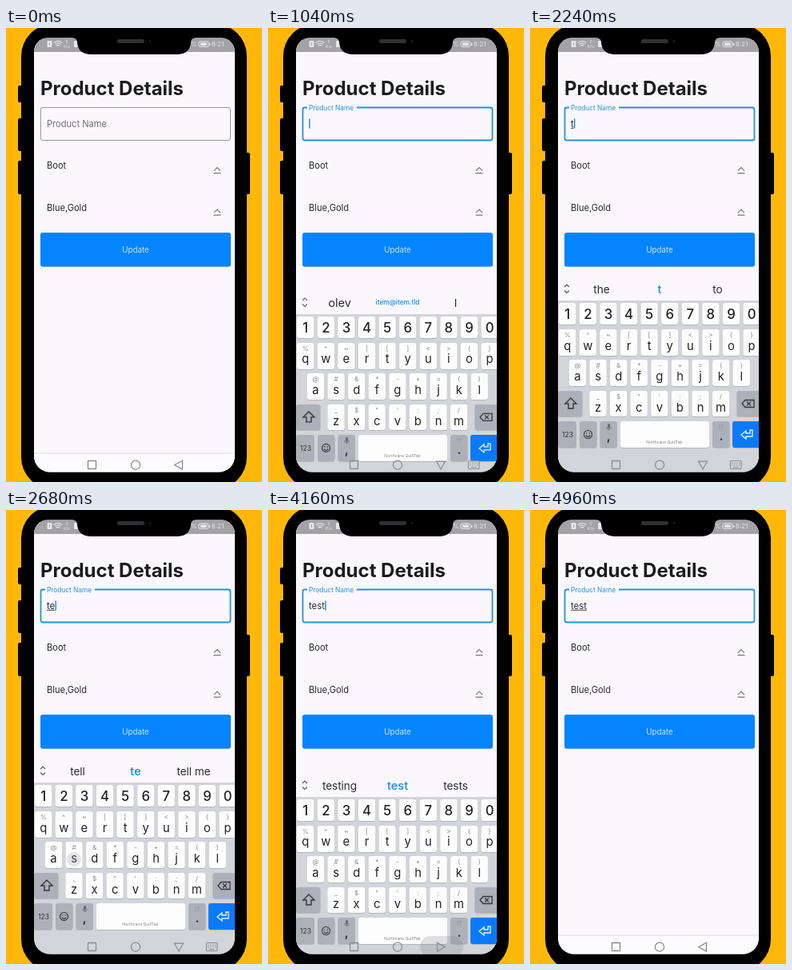
Animation of 320 by 568 pixels, one loop 5 s. Source, as an HTML page with a canvas:

```html
<!DOCTYPE html>
<html lang="en">
<head>
<meta charset="utf-8">
<title>Product form</title>
<style>
html, body { margin: 0; width: 100%; height: 100%; overflow: hidden; background: #ffb80a; }
canvas { display: block; width: 320px; height: 568px; }
</style>
</head>
<body>
<canvas id="stage"></canvas>
<script>
const canvas = document.getElementById('stage');
const ctx = canvas.getContext('2d');
const ratio = window.devicePixelRatio || 1;
canvas.width = 320 * ratio;
canvas.height = 568 * ratio;

const LOOP = 5000, FOCUS = 660, HIDE = 4080;
const PAPER = '#faf8fc', BLUE = '#0484fe', FOCUS_BLUE = '#2492dc', INK = '#2b2b30', GRAY = '#8b8b90';
const PITCH = 25.6;

// Each step: start time, typed text, suggestions, tapped key position.
const STEPS = [
  { at: FOCUS, text: '', words: ['olev', 'item@item.tld', 'I'] },
  { at: 2160, text: 't', words: ['the', 't', 'to'], tap: [149, 397] },
  { at: 2440, text: 'te', words: ['tell', 'te', 'tell me'], tap: [98, 397] },
  { at: 2760, text: 'tes', words: ['test', 'tes', 'tests'], tap: [85, 437] },
  { at: 3150, text: 'test', words: ['testing', 'test', 'tests'], tap: [149, 397] }
];

const progress = (t, start, length) => Math.min(1, Math.max(0, (t - start) / length));
const mix = (a, b, p) => a + (b - a) * p;

function text(str, x, y, size, color = INK, align = 'left', weight = 400) {
  ctx.font = `${weight} ${size}px Inter, sans-serif`;
  ctx.textAlign = align;
  ctx.fillStyle = color;
  ctx.fillText(str, x, y);
}
function box(x, y, w, h, r, color) {
  ctx.fillStyle = color;
  ctx.beginPath();
  ctx.roundRect(x, y, w, h, r);
  ctx.fill();
}
function circle(x, y, r, color) {
  ctx.fillStyle = color;
  ctx.beginPath();
  ctx.arc(x, y, r, 0, Math.PI * 2);
  ctx.fill();
}
function line(points, color, width = 1.2, closed = false) {
  ctx.strokeStyle = color;
  ctx.lineWidth = width;
  ctx.beginPath();
  points.forEach(([x, y]) => ctx.lineTo(x, y));
  if (closed) ctx.closePath();
  ctx.stroke();
}
function frameBox(x, y, w, h, r, color, width) {
  ctx.strokeStyle = color;
  ctx.lineWidth = width;
  ctx.beginPath();
  ctx.roundRect(x, y, w, h, r);
  ctx.stroke();
}
function arc(x, y, r, from, to, color, width) {
  ctx.strokeStyle = color;
  ctx.lineWidth = width;
  ctx.beginPath();
  ctx.arc(x, y, r, from, to);
  ctx.stroke();
}
const ring = (x, y, r, color, width) => arc(x, y, r, 0, Math.PI * 2, color, width);

function phoneBody() {
  ctx.fillStyle = '#ffb80a';
  ctx.fillRect(0, 0, 320, 568);
  [[15, 72, 21], [15, 113, 41], [15, 166, 42], [297, 156, 52]].forEach(([x, y, h]) => box(x, y, 8, h, 2, '#000'));
  box(19, -5, 282, 582, 40, '#000');
}

function notch() {
  ctx.fillStyle = '#000';
  ctx.beginPath();
  ctx.moveTo(83, 12);
  ctx.quadraticCurveTo(89, 13, 89, 18);
  ctx.quadraticCurveTo(90, 32, 105, 33);
  ctx.lineTo(215, 33);
  ctx.quadraticCurveTo(230, 32, 231, 18);
  ctx.quadraticCurveTo(231, 13, 237, 12);
  ctx.fill();
  box(139, 14, 34, 5, 2.5, '#303033');
  circle(180, 16.5, 1.2, '#26262a');
}

function statusBar() {
  ctx.fillStyle = '#a3a2a5';
  ctx.fillRect(35, 12, 251, 18);
  const pale = '#e8e8ea';
  box(51.5, 16, 6, 8, 1, pale);
  line([[54.5, 18], [54.5, 22]], '#a3a2a5', 1);
  [2.5, 5, 7.5].forEach(r => arc(65, 24, r, -Math.PI * .75, -Math.PI * .25, pale, 1.2));
  text('0', 76, 19, 5, pale, 'center');
  text('K/s', 76, 25, 5, pale, 'center');
  box(85, 16, 5, 8, 1, pale);
  text('%', 231, 23, 7.5, pale);
  frameBox(241, 17, 12, 6.5, 2, pale, 1);
  box(243, 18.5, 8, 3.5, 1, pale);
  box(254, 19, 1.3, 3, .5, pale);
  text('8:21', 257, 23.2, 8, pale);
}

function dropdown(label, y) {
  text(label, 51, y, 11.1);
  line([[260, y + 2.6], [264, y - 1.4], [268, y + 2.6]], '#77777c', 1.2);
  line([[259.5, y + 5.6], [268.5, y + 5.6]], '#77777c', 1.3);
}

function form(t, step) {
  text('Product Details', 43, 84, 24, '#1c1c20', 'left', 700);

  const focused = t >= FOCUS;
  const lift = progress(t, FOCUS, 150);
  frameBox(43.5, 99.5, 237, 41, 2.5, focused ? FOCUS_BLUE : '#98979b', focused ? 1.8 : 1);
  if (focused) {
    ctx.fillStyle = PAPER;
    ctx.fillRect(49, 97, 62 * lift, 5);
  }
  text('Product Name', 51, mix(124, 103, lift), mix(11.1, 8.3, lift), focused ? FOCUS_BLUE : '#707075');

  if (focused) {
    text(step.text, 51, 123.5, 11.4);
    const width = ctx.measureText(step.text).width;
    const composing = t < HIDE + 50 || t > 4460;
    if (width && composing) line([[51, 125.3], [51 + width, 125.3]], INK, .9);
    if ((t - step.at) % 1000 < 500) {
      ctx.fillStyle = FOCUS_BLUE;
      ctx.fillRect(51.2 + width, 113.5, 1.5, 12);
    }
  }

  dropdown('Boot', 176);
  dropdown('Blue,Gold', 228.5);
  box(43, 257, 238, 42, 3, '#b9cbe2');
  box(43, 256, 238, 42.5, 3, BLUE);
  text('Update', 162, 281, 9.8, '#c8e5ff', 'center');
}

function key(x, y, w, h, color = '#fdfdfe') {
  box(x, y + 1, w, h, 3, '#b4b6bc');
  box(x, y, w, h, 3, color);
}

function letterRow(letters, hints, firstX, y, h, hintY, baseY) {
  [...letters].forEach((letter, i) => {
    const x = firstX + i * PITCH;
    key(x - 10.6, y, 21.2, h);
    text(hints[i], x, hintY, 8.2, '#8a8a90', 'center');
    text(letter, x, baseY, 14.8, '#222226', 'center');
  });
}

function suggestions(words, first) {
  line([[43, 324], [46, 321], [49, 324]], '#555', 1.1);
  line([[43, 328.5], [46, 331.5], [49, 328.5]], '#555', 1.1);
  text(words[0], 89.5, 332, first ? 14.6 : 13.5, INK, 'center');
  if (first) text(words[1], 162, 329.5, 8.3, '#168bec', 'center', 500);
  else text(words[1], 162, 332, 14.6, '#168bec', 'center', 500);
  text(words[2], 234.5, 332, 13.5, INK, 'center');
}

function specialKeys() {
  const dull = '#adb0b8', dark = '#34353a';
  key(35, 454, 30.5, 32, dull);
  line([[51, 463], [58, 470], [54, 470], [54, 476], [48, 476], [48, 470], [44, 470]], dark, 1.4, true);
  key(258.5, 454, 30, 32, dull);
  line([[265, 470], [269, 465.5], [280, 465.5], [280, 474.5], [269, 474.5]], dark, 1.3, true);
  line([[271, 467.5], [276, 472.5]], dark);
  line([[276, 467.5], [271, 472.5]], dark);

  [[35, 23], [62, 21.5], [87.5, 21.5], [228, 21.5]].forEach(([x, w]) => key(x, 492, w, 33, dull));
  text('123', 47, 512, 8.5, dark, 'center');
  ring(72.5, 508.5, 5, dark, 1.1);
  circle(70.7, 507, .8, dark);
  circle(74.3, 507, .8, dark);
  arc(72.5, 508.7, 2.6, .3, Math.PI - .3, dark, 1.1);
  box(97, 495, 3, 5.5, 1.5, '#666870');
  line([[95.5, 499], [96.5, 501.5], [100.5, 501.5], [101.5, 499]], '#666870', .8);
  line([[98.5, 501.5], [98.5, 503.5]], '#666870', .8);
  text(',', 98.3, 516, 15, dark, 'center', 700);
  key(113, 492, 111, 33);
  text('Northvane QuillTab', 168, 520, 5, '#85858a', 'center');
  text('!?', 239, 502, 7.5, '#8a8c93', 'center');
  text('.', 239, 516, 15, dark, 'center', 700);
  key(253, 492, 36, 33, '#0a7afa');
  line([[264, 509], [270, 504], [270, 507], [275, 507], [275, 503], [278, 503], [278, 511], [270, 511], [270, 514]], '#e8f4ff', 1.3, true);
}

function keyboard(t, step) {
  const rise = 1 - Math.pow(1 - progress(t, 900, 240), 3);
  const fall = Math.pow(progress(t, HIDE, 280), 2);
  const shift = 241 * (1 - rise) + 215 * fall;
  if (t < 900 || fall === 1) return false;
  ctx.save();
  ctx.translate(0, shift);
  ctx.fillStyle = PAPER;
  ctx.fillRect(35, 314, 251, 28);
  ctx.fillStyle = '#d3d4d9';
  ctx.fillRect(35, 341, 251, 230);
  suggestions(step.words, step === STEPS[0]);
  [...'1234567890'].forEach((digit, i) => {
    const x = 46.7 + i * PITCH;
    key(x - 10.6, 344, 21.2, 27);
    text(digit, x, 364, 16.8, '#222226', 'center', 500);
  });
  letterRow('qwertyuiop', '%^~|[]<>{}', 46.7, 377, 33, 387, 402.5);
  letterRow('asdfghjkl', '@#&*-+=()', 59.5, 415, 33, 425, 441);
  letterRow('zxcvbnm', '_$"\':;/', 85, 454, 32, 464, 480);
  specialKeys();
  ctx.restore();

  STEPS.forEach(({ at, tap }) => {
    if (tap && t > at - 100 && t < at + 20) circle(...tap, 9, 'rgba(160,160,168,.28)');
  });
  return true;
}

function navigation(t, keyboardShown) {
  if (!keyboardShown) {
    ctx.fillStyle = '#fcfbfd';
    ctx.fillRect(35, 532, 251, 24);
    line([[35, 532], [286, 532]], '#dedde1', 1);
  }
  if (t > HIDE && t < HIDE + 240) box(190, 533, 54, 26, 13, 'rgba(120,120,126,.22)');

  frameBox(102.5, 541.5, 10, 10, .5, GRAY, 1.3);
  ring(162, 546.7, 5.6, GRAY, 1.3);

  const angle = 180 - 90 * progress(t, 740, 180) - 270 * progress(t, HIDE, 240);
  ctx.save();
  ctx.translate(216, 546.7);
  ctx.rotate(angle * Math.PI / 180);
  line([[5.3, 0], [-4.5, -5.4], [-4.5, 5.4]], GRAY, 1.3, true);
  ctx.restore();

  if (t > 780 && t < HIDE + 40) {
    frameBox(250.5, 541.5, 13.5, 10, 1, GRAY, 1.1);
    for (let i = 0; i < 8; i++) {
      ctx.fillStyle = GRAY;
      ctx.fillRect(252.3 + (i % 4) * 2.9, 543.7 + Math.floor(i / 4) * 2.4, 1.3, 1.2);
    }
    line([[254, 549.5], [260.5, 549.5]], GRAY, 1);
  }
}

function draw(t) {
  const step = STEPS.filter(s => t >= s.at).pop() || STEPS[0];
  ctx.setTransform(ratio, 0, 0, ratio, 0, 0);
  phoneBody();
  ctx.save();
  ctx.beginPath();
  ctx.roundRect(35, 12.5, 251, 543, [17, 17, 20, 20]);
  ctx.clip();
  ctx.fillStyle = PAPER;
  ctx.fillRect(35, 12, 251, 544);
  statusBar();
  form(t, step);
  navigation(t, keyboard(t, step));
  ctx.restore();
  notch();
}

const start = performance.now();
function tick() {
  draw((performance.now() - start) % LOOP);
  requestAnimationFrame(tick);
}
tick();
</script>
</body>
</html>
```
